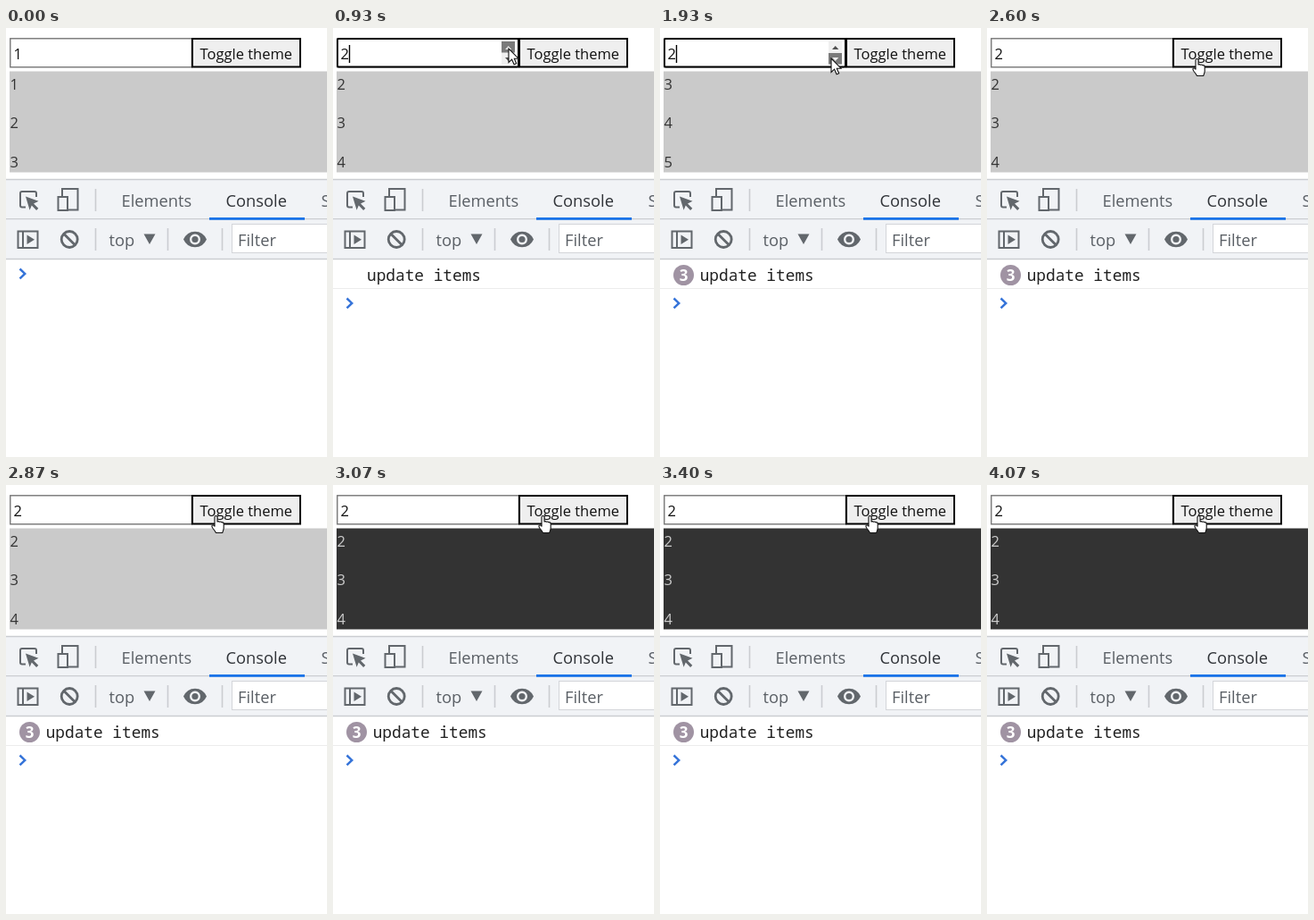
Write an HTML page that moves like this. It is 360 by 480 pixels and loops after 4.59 s.

```html
<!DOCTYPE html>
<html lang="en">
<head>
<meta charset="utf-8">
<title>Toggle theme</title>
<style>
html, body { margin: 0; width: 100%; height: 100%; overflow: hidden; background: #fff; }
svg { display: block; width: 360px; height: 480px; }
text { font-family: "Open Sans", "Noto Sans", sans-serif; white-space: pre; }
.page { font-size: 16.5px; fill: #111; }
.tools { font-size: 18.3px; fill: #5a5f65; }
.log text { font: 17.8px "Noto Sans Mono", monospace; fill: #222; }
.log .count { font: 700 17px "Open Sans", sans-serif; fill: #fff; text-anchor: middle; }
.icon { fill: none; stroke: #62676c; stroke-width: 2; }
.solid { fill: #62676c; }
.rule { stroke: #cbcdd1; stroke-width: 1.3; }

/* Everything switches on one shared 4590 ms clock. */
.t { animation: 4590ms step-end infinite; }
.first { animation-name: first; }
.second { animation-name: second; }
.third { animation-name: third; }
.list-second { animation-name: list-second; }
.list-third { animation-name: list-third; }
.one-log { animation-name: one-log; }
.last-log { animation-name: last-log; }
.any-log { animation-name: any-log; }
.prompt { animation-name: prompt; }
.focus { animation-name: focus; }
.spinner { animation-name: spinner; }
.up-hot { animation-name: up-hot; }
.down-hot { animation-name: down-hot; }
.theme { animation-name: theme; }
.items { animation-name: items; }
.arrow { animation-name: arrow-shown; }
.hand { animation-name: hand-shown; }
.arrow-path { animation: arrow-path 4590ms linear infinite; }
.hand-path { animation: hand-path 4590ms linear infinite; }

@keyframes first { 0% { opacity: 1 } 20.2%, 100% { opacity: 0 } }
@keyframes second { 0%, 32% { opacity: 0 } 20.2%, 42%, 100% { opacity: 1 } }
@keyframes third { 0%, 42%, 100% { opacity: 0 } 32% { opacity: 1 } }
@keyframes list-second { 0%, 32% { opacity: 0 } 20.2%, 43.5%, 100% { opacity: 1 } }
@keyframes list-third { 0%, 43.5%, 100% { opacity: 0 } 32% { opacity: 1 } }
@keyframes one-log { 0%, 32%, 100% { opacity: 0 } 20.2% { opacity: 1 } }
@keyframes last-log { 0% { opacity: 0 } 42%, 100% { opacity: 1 } }
@keyframes any-log { 0% { opacity: 0 } 20.2%, 100% { opacity: 1 } }
@keyframes prompt { 0% { transform: none } 20.2%, 100% { transform: translateY(33px) } }
@keyframes focus { 0%, 55.1%, 100% { opacity: 0 } 20.2% { opacity: 1 } }
@keyframes spinner { 0%, 55.1%, 100% { opacity: 0 } 15.8% { opacity: 1 } }
@keyframes up-hot { 0%, 37.7%, 100% { opacity: 0 } 15.8% { opacity: 1 } }
@keyframes down-hot { 0%, 46.4%, 100% { opacity: 0 } 37.7% { opacity: 1 } }
@keyframes theme {
  0%, 62.4%, 69.6%, 77.2% { fill: #cacaca }
  58.1%, 66.8%, 74%, 81.2%, 100% { fill: #333 }
}
@keyframes items {
  0%, 62.4%, 69.6%, 77.2% { fill: #333 }
  58.1%, 66.8%, 74%, 81.2%, 100% { fill: #ccc }
}
@keyframes arrow-shown { 0%, 48%, 100% { opacity: 0 } 1.5% { opacity: 1 } }
@keyframes hand-shown { 0% { opacity: 0 } 48%, 100% { opacity: 1 } }
@keyframes arrow-path {
  0%, 1.5% { transform: translate(250px, 40px) }
  10.2%, 11.6% { transform: translate(323px, 194px) }
  15.8%, 36.3% { transform: translate(197px, 23px) }
  39.2%, 45% { transform: translate(192px, 34px) }
  48%, 100% { transform: translate(210px, 35px) }
}
@keyframes hand-path {
  0%, 48% { transform: translate(-22px, 0) }
  50.7%, 87.2% { transform: none }
  88.6%, 100% { transform: translate(2px, 0) }
}
</style>
</head>
<body>
<svg viewBox="0 0 360 480">
  <rect width="360" height="480" fill="#fff"/>

  <g class="page">
    <rect x="4.8" y="11.8" width="203.6" height="32" fill="#fff" stroke="#767676" stroke-width="1.4"/>
    <rect x="209" y="12" width="121" height="31.5" fill="#efefef" stroke="#000" stroke-width="2"/>
    <text x="217.5" y="35">Toggle theme</text>
    <rect class="t focus" x="5" y="12" width="203" height="31.5" rx="1.5" fill="none" stroke="#000" stroke-width="2"/>
    <text class="t first" x="8.5" y="35">1</text>
    <text class="t second" x="8.5" y="35">2</text>
    <text class="t third" x="8.5" y="35">3</text>
    <path class="t focus" d="M18.5 19V39" stroke="#000" stroke-width="1.4"/>

    <g class="t spinner">
      <path d="M189 15h15v26h-15z" fill="#f0f0f0"/>
      <path class="t up-hot" d="M189 15h15v12.5h-15z" fill="#7b7b7b"/>
      <path class="t down-hot" d="M189 28h15v12.5h-15z" fill="#7b7b7b"/>
      <path d="M193 24l3.7-4 3.7 4zM193 33l3.7 4 3.7-4z" fill="#505050"/>
      <path class="t up-hot" d="M193 24l3.7-4 3.7 4z" fill="#eee"/>
      <path class="t down-hot" d="M193 33l3.7 4 3.7-4z" fill="#eee"/>
    </g>

    <rect class="t theme" x="4" y="48.5" width="356" height="113"/>
    <g class="t items">
      <g class="t first">
        <text x="4.5" y="68.5">1</text><text x="4.5" y="112">2</text><text x="4.5" y="155.5">3</text>
      </g>
      <g class="t list-second">
        <text x="4.5" y="68.5">2</text><text x="4.5" y="112">3</text><text x="4.5" y="155.5">4</text>
      </g>
      <g class="t list-third">
        <text x="4.5" y="68.5">3</text><text x="4.5" y="112">4</text><text x="4.5" y="155.5">5</text>
      </g>
    </g>
  </g>

  <g class="tools">
    <rect y="169" width="360" height="90" fill="#f1f3f6"/>
    <path class="rule" d="M0 169.5H360M0 213.7H360M0 258.5H360"/>
    <path class="rule" d="M100.5 180V205M100.5 224V249M181.5 224V249M242.5 224V249" style="stroke-width:1.6"/>
    <rect x="228" y="212" width="107" height="2.8" fill="#1a73e8"/>
    <text x="129.5" y="199.5">Elements</text>
    <text x="246.5" y="199.5" fill="#303338">Console</text>
    <text x="353.5" y="199.5">S</text>

    <path class="icon" d="M22 200.5H18q-2 0-2-2V185q0-2 2-2H32q2 0 2 2V189"/>
    <path class="solid" d="M22 188.5l14.5 5.3-5.5 2.6 5.3 5.3-2.2 2.2-5.3-5.3-2.2 5.2z"/>
    <path class="icon" d="M63 188V180H80.5V203.5H70"/>
    <rect class="icon" x="58.5" y="189" width="10.5" height="15"/>

    <path class="icon" d="M13.5 227.5H35.5V246H13.5zM19 227.5V246"/>
    <path class="solid" d="M23.5 231.5l8.5 5.2-8.5 5.2z"/>
    <circle class="icon" cx="71.2" cy="236.5" r="9" style="stroke-width:2.8"/>
    <path class="icon" d="M64.8 230.2l12.8 12.7" style="stroke-width:2.8"/>
    <text x="115.5" y="243.5">top</text>
    <path class="solid" d="M154.5 230.5h13l-6.5 11.5z"/>
    <path class="solid" d="M199 236.5q4-8.8 13-8.8t13 8.8q-4 8.8-13 8.8t-13-8.8z"/>
    <circle cx="212" cy="236.5" r="4.8" fill="#62676c" stroke="#f1f3f6" stroke-width="2.4"/>
    <rect x="253.5" y="219.5" width="120" height="32" fill="#fff" stroke="#d3d5d9"/>
    <text x="260" y="244.2">Filter</text>
  </g>

  <g class="log">
    <path class="t any-log" d="M0 291.5H360" stroke="#ececec"/>
    <text class="t one-log" x="38" y="283">update items</text>
    <g class="t third">
      <circle cx="26.5" cy="276.5" r="11.5" fill="#a093a3"/>
      <text class="count" x="26.5" y="282.7">2</text>
      <text x="44.7" y="283">update items</text>
    </g>
    <g class="t last-log">
      <circle cx="26.5" cy="276.5" r="11.5" fill="#a093a3"/>
      <text class="count" x="26.5" y="282.7">3</text>
      <text x="44.7" y="283">update items</text>
    </g>
    <path class="t prompt" d="M15.5 269.5l5.7 5.4-5.7 5.4" fill="none" stroke="#3674d9" stroke-width="2.5"/>
  </g>

  <g class="t arrow">
    <path class="arrow-path" d="M0 0V15.5l3.6-3.3 2.5 5.6 2.6-1.1-2.4-5.5H11z" fill="#fff" stroke="#111" stroke-width="1.1"/>
  </g>
  <g class="t hand">
    <path class="hand-path" d="M234 45.5V36.2q0-1.7 1.5-1.7t1.5 1.7V41q1.200-.8 2.400.3 1.200-.8 2.300.4 2.500-.3 2.500 2V48q0 2-1.500 5.500H235.500q-1.300-2.500-3.500-5-1.500-2-1-3 1.200-1.300 3 .7z" fill="#fff" stroke="#111" stroke-width="1.1" stroke-linejoin="round"/>
  </g>
</svg>
</body>
</html>
```
